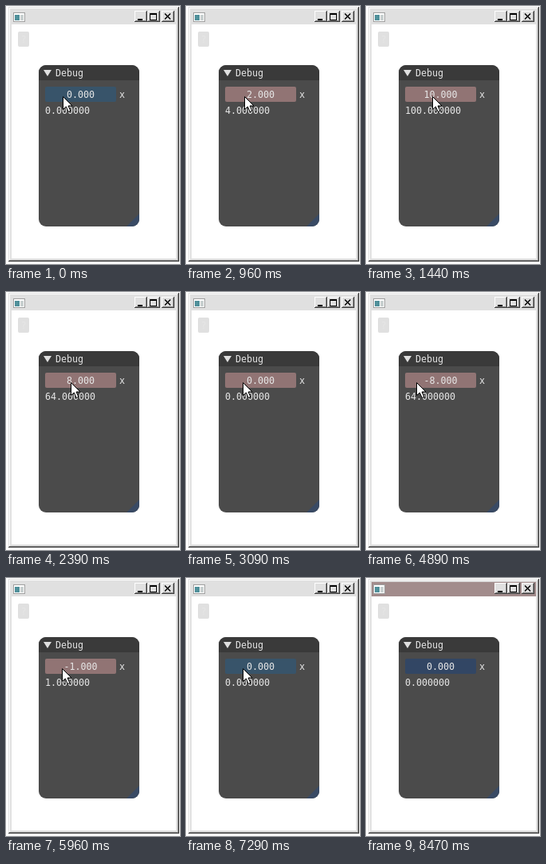
An HTML page for the animation above (8.53 s loop, 218x323 px).

```html
<!DOCTYPE html>
<html lang="en">
<head>
<meta charset="utf-8">
<style>
html, body { margin: 0; width: 100%; height: 100%; overflow: hidden; background: #fff; }
svg { display: block; width: 218px; height: 323px; }
text { font: 11.627px "DejaVu Sans Mono", monospace; fill: #e6e6e6; white-space: pre; }
</style>
</head>
<body>
<svg viewBox="0 0 218 323">
  <!-- window frame -->
  <g shape-rendering="crispEdges">
    <path fill="#e0e0e0" d="M3 1H217V320H3Z"/>
    <path fill="#fff" d="M4 2H215V3H5V318H4Z"/>
    <path fill="#808080" d="M215 2H216V319H4V318H215Z"/>
    <path fill="#404040" d="M216 1H217V320H3V319H216Z"/>
    <path fill="#fff" d="M7 23H213V316H7Z"/>
    <rect id="caption" x="7" y="5" width="206" height="18"/>
    <path fill="#fff" stroke="#a0a0a0" d="M9.5 8.5H23.5V19.5H9.5Z"/>
    <path fill="#50909a" d="M11 11H17V18H11Z"/>
    <path fill="#c8d0d0" d="M18 11H22V18H18Z"/>
    <g id="buttons"></g>
    <path fill="#000" d="M165 16H171V18H165Z"/>
    <path fill="none" stroke="#000" d="M180.5 9V17.5H188.5V9M180 9.5H189M180 10.5H189"/>
  </g>
  <path stroke="#000" stroke-width="1.5" d="M199 9.5L206 16.5M206 9.5L199 16.5"/>
  <rect x="15" y="32" width="14" height="19" rx="2" fill="#e0e0e0"/>
  <text x="18.5" y="46">?</text>

  <!-- debug panel -->
  <rect x="41" y="74" width="126" height="202" rx="9" fill="#4b4b4b"/>
  <path fill="#3a3a3a" d="M41 93V83A9 9 0 0 1 50 74H158A9 9 0 0 1 167 83V93Z"/>
  <path fill="#394a64" d="M167 260V267A9 9 0 0 1 158 276H151Z"/>
  <path fill="#e0e0e0" d="M47 80H57L52 88Z"/>
  <text x="62" y="88">Debug</text>
  <rect id="field" x="49" y="101" width="89" height="19" rx="2"/>
  <text id="value" x="93.5" y="115" text-anchor="middle"></text>
  <text x="142" y="115">x</text>
  <text id="square" x="49" y="135"></text>
  <path id="cursor" fill="#fff" stroke="#000"
    d="M.5 .5V16.5L4.3 13L7.2 19.5L9.8 18.3L7 12H12Z"/>
</svg>
<script>
const LOOP = 8530, PRESS = 620, RELEASE = 7290, GONE = 7880, INACTIVE = 8470;
const STEP = 117; // ms between pointer updates
const $ = id => document.getElementById(id);

// Each drag starts at a time and eases to a value in a number of updates.
const drags = [
  { start: 960, steps: 7, to: 11 },
  { start: 2170, steps: 1, to: 10 },
  { start: 2390, steps: 8, to: -0.6 },
  { start: 3330, steps: 5, to: -10 },
  { start: 4890, steps: 5, to: -3 },
  { start: 5840, steps: 2, to: -1 },
  { start: 6930, steps: 1, to: 0 }
];

function dragValue(t) {
  let value = 0;
  for (const { start, steps, to } of drags) {
    if (t < start) break;
    const done = Math.min(steps, 1 + Math.floor((t - start) / STEP));
    value += (to - value) * Math.sin(done / steps * Math.PI / 2);
  }
  return Math.round(value);
}

function pointer(t, value) {
  const exitStep = Math.max(0, Math.floor((t - RELEASE) / STEP));
  const away = (exitStep / 4) ** 1.5;
  const x = 71 + value * (value > 0 ? 1.2 : 1) + 92 * away;
  return [Math.round(x), Math.round(113 + 189 * away)];
}

$("buttons").innerHTML = [161, 177, 195].map(x => `
  <path fill="#404040" d="M${x} 6h16v14h-16z"/>
  <path fill="#fff" d="M${x} 6h15v13h-15z"/>
  <path fill="#808080" d="M${x + 1} 7h14v12h-14z"/>
  <path fill="#e0e0e0" d="M${x + 1} 7h13v11h-13z"/>`).join("");

function draw(t) {
  const value = dragValue(t);
  const dragging = t >= PRESS && t < RELEASE;
  const hovered = t < RELEASE + STEP;
  $("value").textContent = value.toFixed(3);
  $("square").textContent = (value * value).toFixed(6);
  $("field").setAttribute("fill", dragging ? "#917474" : hovered ? "#38546a" : "#324664");
  $("caption").setAttribute("fill", t < INACTIVE ? "#e0e0e0" : "#a28c8c");
  $("cursor").setAttribute("transform", `translate(${pointer(t, value)})`);
  $("cursor").style.display = t < GONE ? "" : "none";
}

function tick() {
  draw(performance.now() % LOOP);
  requestAnimationFrame(tick);
}
tick();
</script>
</body>
</html>
```
